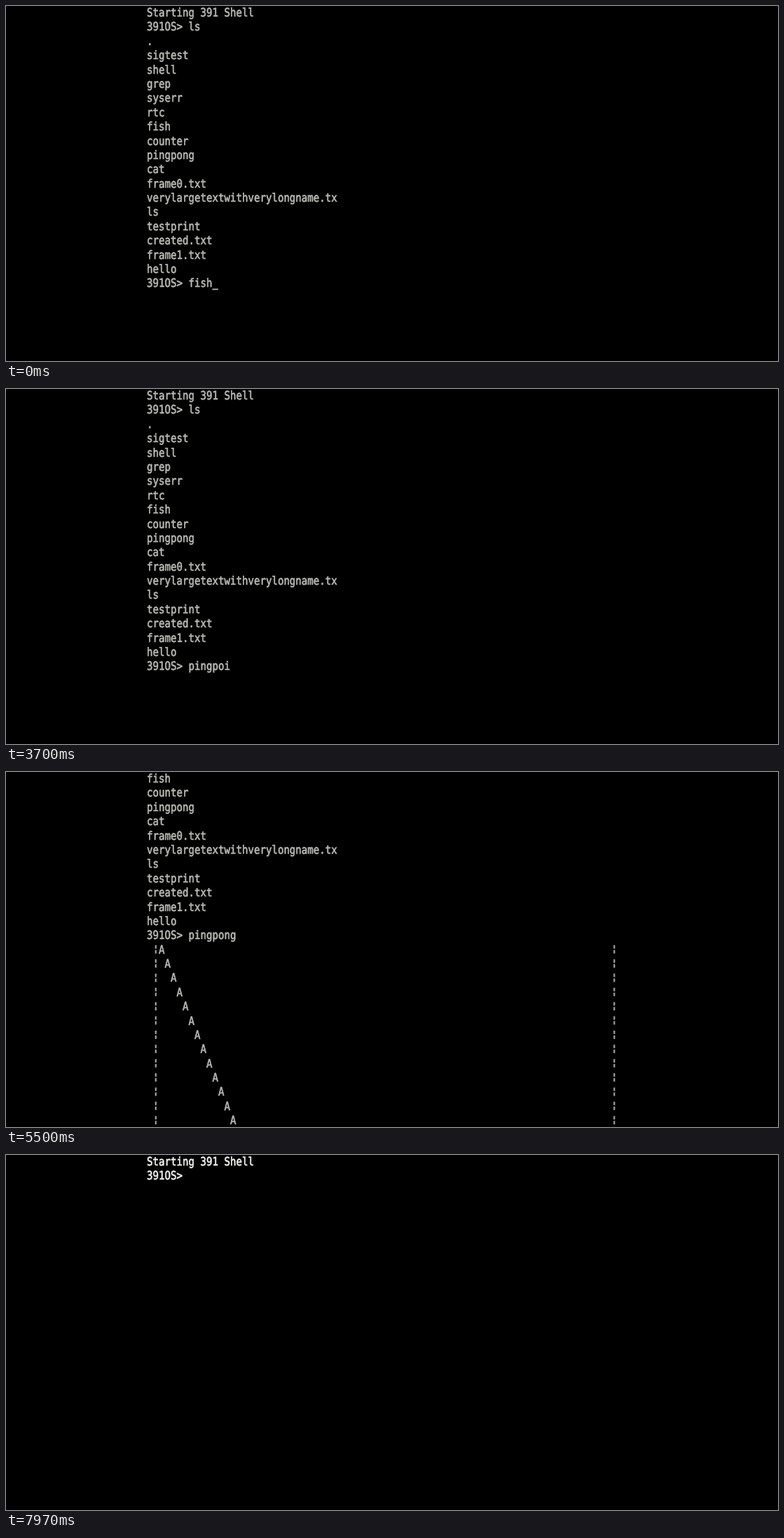
Recreate the animation shown at these times as an HTML page. Size 1102 px wide and 508 px high, loop 8 s.

```html
<!DOCTYPE html>
<html lang="en">
<head>
<meta charset="utf-8">
<title>Terminal</title>
<style>
  html, body { margin: 0; width: 100%; height: 100%; overflow: hidden; background: #000; }
  svg { display: block; width: 1102px; height: 508px; }
  text {
    font: 14.12px "DejaVu Sans Mono", "Liberation Mono", monospace;
    white-space: pre;
    text-rendering: geometricPrecision;
    stroke: currentColor;
    stroke-width: .6px;
  }
  #screen { color: #b8b8b2; fill: currentColor; }
  #screen.fresh { color: #f0f0ee; }
  .bars { fill: #a2a298; }
</style>
</head>
<body>
<svg id="screen" viewBox="0 0 1102 508"></svg>
<script>
const LOOP = 8000;
const COL = 8.5, ROW = 20.38, LEFT = 201, BASE = 15.1, ROWS = 25;
const TALL = 1.18;            // cell aspect of the text mode
const ENTER = 4746, TICK = 62.5, SWITCH = 7500;
const BLINK = 270, BLINK_AT = 200;
const PROMPT = "391OS> ";

const listing = ("Starting 391 Shell|" + PROMPT + "ls|.|sigtest|shell|grep|syserr|rtc|fish|" +
  "counter|pingpong|cat|frame0.txt|verylargetextwithverylongname.tx|ls|testprint|" +
  "created.txt|frame1.txt|hello").split("|");

// Key presses as [time, key]; "<" is backspace.
const keys = [
  [890, "<"], [960, "<"], [1030, "<"], [1110, "<"],
  [1290, "p"], [1410, "i"], [1540, "n"], [1670, "g"],
  [3350, "p"], [3480, "o"], [3620, "i"],
  [3840, "<"], [3980, "n"], [4120, "g"]
];

const screen = document.getElementById("screen");

function add(name, attrs) {
  const el = document.createElementNS("http://www.w3.org/2000/svg", name);
  for (const k in attrs) el.setAttribute(k, attrs[k]);
  screen.appendChild(el);
  return el;
}

const colX = c => LEFT + c * COL;
const baseY = r => BASE + r * ROW;

function barPath(r) {
  const y = baseY(r) - 12;
  return [1, 78].map(c => {
    const x = colX(c) + 3.2;
    return `M${x} ${y}h2.2v5h-2.2zM${x} ${y + 7}h2.2v5h-2.2z`;
  }).join("");
}

const rows = Array.from({ length: ROWS }, (_, r) => ({
  text: add("text", {}),
  bars: add("path", { class: "bars", d: barPath(r) })
}));
const cursor = add("rect", { width: COL, height: 1.8 });

function typed(t) {
  let s = "fish";
  for (const [at, key] of keys) {
    if (t < at) break;
    s = key === "<" ? s.slice(0, -1) : s + key;
  }
  return s;
}

function setRow(r, str, col, bars) {
  const { text, bars: path } = rows[r];
  text.textContent = str;
  text.setAttribute("transform", `translate(${colX(col)} ${baseY(r)}) scale(1 ${TALL})`);
  path.style.display = bars ? "" : "none";
}

function draw(t) {
  const fresh = t >= SWITCH;
  const command = PROMPT + typed(t);
  const lines = fresh ? [listing[0], PROMPT] : [...listing, command];
  const balls = fresh || t < ENTER ? 0 : Math.floor((t - ENTER) / TICK) + 1;
  const top = Math.max(0, lines.length + balls - ROWS);

  for (let r = 0; r < ROWS; r++) {
    const ball = top + r - lines.length;
    if (ball < 0) setRow(r, lines[top + r], 0, false);
    else if (ball < balls) setRow(r, "A", 2 + ball, true);
    else setRow(r, "", 0, false);
  }

  const lit = Math.floor((t - BLINK_AT) / BLINK) % 2 !== 0;
  cursor.style.display = lit && t < ENTER ? "" : "none";
  cursor.setAttribute("x", colX(command.length));
  cursor.setAttribute("y", baseY(listing.length) + 2.2);
  screen.setAttribute("class", fresh ? "fresh" : "");
}

function loop() {
  draw(performance.now() % LOOP);
  requestAnimationFrame(loop);
}
loop();
</script>
</body>
</html>
```
